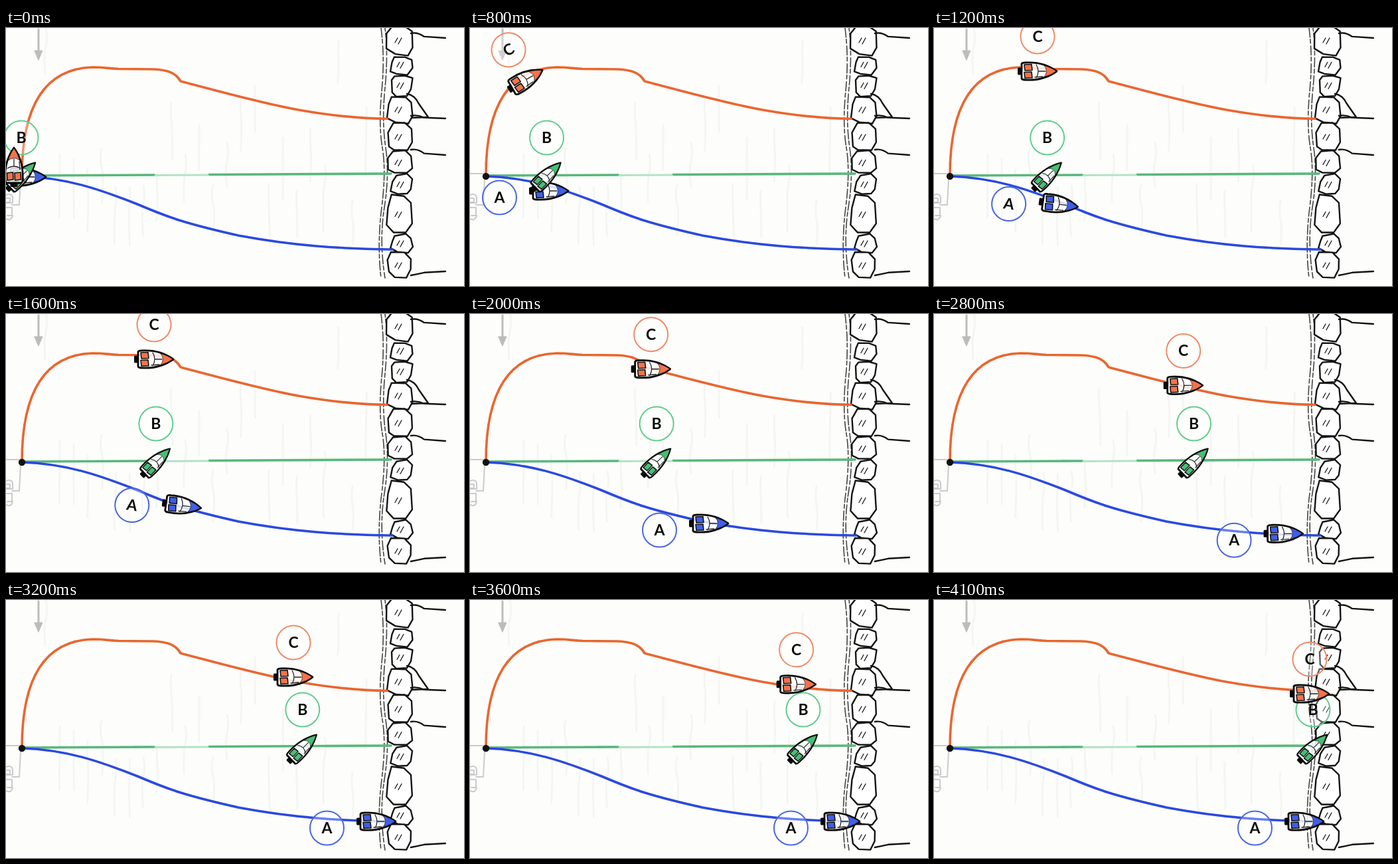
Animation of 690x388 px, one loop 4.2 s. Source, as an HTML page:

```html
<!DOCTYPE html>
<html lang="en">
<head>
<meta charset="utf-8">
<title>Three boats crossing a river</title>
<style>
html, body { margin: 0; width: 100%; height: 100%; overflow: hidden; background: #fdfefb; }
svg { display: block; width: 100%; height: 100%; }
path, circle, line { fill: none; stroke-linecap: round; stroke-linejoin: round; }
.ripples { stroke: #f5f6f2; stroke-width: 3; }
.arrow { stroke: #bcbcbc; stroke-width: 3; }
.dock { stroke: #cbcbcb; stroke-width: 2; }
.bank { stroke: #141414; stroke-width: 2.4; }
.bank .thin { stroke-width: 1.3; }
.bank .edge { stroke: #444; stroke-width: 1.6; stroke-dasharray: 14 3 6 4; }
.stone { fill: #fff; }
.routes { stroke-width: 3.6; }
.boat .hull { fill: rgba(255, 255, 255, .82); stroke: #080808; stroke-width: 2.8; }
.boat .paint { fill: var(--paint); stroke: #111; stroke-width: 1.6; }
.boat .trim { stroke: #222; stroke-width: 1.3; }
.boat .ring { fill: rgba(255, 255, 255, .3); stroke: var(--ring); stroke-width: 2; }
text { font: 700 23px Lato, "Open Sans", sans-serif; text-anchor: middle; fill: #0b0b0b; }
</style>
</head>
<body>
<svg viewBox="0 0 690 388" preserveAspectRatio="none">
  <path class="ripples" id="ripples"/>
  <g class="arrow">
    <line x1="49" y1="2" x2="49" y2="34"/>
    <path d="M43 34H55L49 48Z" style="fill:#bcbcbc;stroke-width:1"/>
  </g>
  <path class="dock" d="M0 219H19M22 228L20 266H9M0 251Q9 248 10 255V263H0M1 256H6V262H1M0 270H9V282H2M0 287Q8 291 10 282"/>

  <g class="bank">
    <path class="edge" d="M565 0Q571 45 566 95T567 180T566 270T565 376"/>
    <path class="edge" d="M571 0Q576 40 571 90T572 180T570 270T571 376" stroke-dashoffset="9"/>
    <path class="stone" id="stones"/>
    <path d="M604 99Q616 101 622 114L636 134L611 135"/>
    <path id="ledges"/>
    <path class="thin" id="glints"/>
  </g>

  <g class="routes">
    <path stroke="#58b87c" d="M24 222L224 221M306 220.5L580 219"/>
    <path stroke="#b4e2c3" stroke-width="3" d="M225 221.5L304 221"/>
    <path stroke="#ea6630" d="M24 222C24 150 40 62 130 59C150 59 155 61 170 61.5L222 62C245 63 256 68 263 80C320 95 385 113 440 123C490 132 530 136 574 136.5"/>
    <path stroke="#2b49e0" d="M24 223C90 225 140 242 198 265C245 285 270 294 350 312C430 327 500 332 582 333"/>
  </g>
  <circle cx="24" cy="223" r="5.2" style="fill:#111"/>
  <g id="boats"></g>
</svg>
<script>
const LOOP = 4200, STEP = 100, START = 130, TURN = 1200;
const $ = id => document.getElementById(id);

// Smooth curve through [time, x, y] points, resting at both ends
function glide(points) {
  const slope = (i, j) => {
    const a = points[Math.max(i - 1, 0)], b = points[Math.min(i + 1, points.length - 1)];
    return (b[j] - a[j]) / (b[0] - a[0]);
  };
  return time => {
    const t = Math.min(Math.max(time, points[0][0]), points[points.length - 1][0]);
    const i = Math.max(1, points.findIndex(p => p[0] >= t));
    const a = points[i - 1], b = points[i], span = b[0] - a[0], p = (t - a[0]) / span;
    return [1, 2].map(j =>
      a[j] * (1 + 2 * p) * (1 - p) ** 2 + b[j] * p * p * (3 - 2 * p) +
      span * p * (1 - p) * (slope(i - 1, j) * (1 - p) - slope(i, j) * p));
  };
}

const crossA = glide([[START, 31, 224], [800, 119, 245], [1600, 265, 288],
  [2000, 360, 315], [2400, 443, 323], [2950, 558, 333]]);
const crossB = glide([[START, 23, 223], [4100, 571, 223]]);
const crossC = glide([[TURN, 156, 65], [1600, 223, 68], [2400, 321, 98],
  [3200, 433, 116], [4100, 566, 141]]);

// Boat C swings a quarter turn before it heads across
function poseC(t) {
  if (t >= TURN) return [...crossC(t), 0];
  const angle = Math.PI / 2 * (1 - t / TURN);
  return [156 - 144 * Math.sin(angle), 65 + 144 * (1 - Math.cos(angle)) ** 1.2, -angle * 180 / Math.PI];
}

const fleet = [
  { name: 'A', paint: '#3f5fe6', ring: '#4a66e2', tilt: 0, beam: 1, label: [-74.5, 10],
    pose: t => [...crossA(t), t > 900 && t < 1800 ? 8 : 0] },
  { name: 'B', paint: '#45c074', ring: '#62cc90', tilt: -44, beam: .82, label: [0, -58],
    pose: t => [...crossB(t), 0] },
  { name: 'C', paint: '#f4734a', ring: '#f08a68', tilt: 0, beam: 1, label: [0, -52], pose: poseC }
];

function boatMarkup({ name, paint, ring, tilt, beam, label: [x, y] }) {
  return `<g class="boat" style="--paint:${paint};--ring:${ring}">
    <g transform="rotate(${tilt}) scale(1 ${beam})">
      <rect x="-30" y="-5.5" width="7" height="11" rx="1.5" fill="#0a0a0a"/>
      <path class="hull" d="M-24 -11Q-23 -13 -19 -13C-4 -14 14 -11 29 0C14 11 -4 14 -19 13Q-23 13 -24 11Z"/>
      <path class="paint" style="stroke-width:.7" d="M10 -8.5Q21 -5.5 28 0Q21 5.5 10 8.5Q17 0 10 -8.5Z"/>
      <path class="paint" d="M-20 -10L-9 -10.5L-8 -1.5L-19 -1ZM-20 1.5L-9 1L-8 10L-19 10.5Z"/>
      <path class="trim" d="M-4 9L8 8M-2 -10Q4 0 -2 10M2 0H12"/>
    </g>
    <circle class="ring" cx="${x}" cy="${y}" r="25.5"/>
    <text x="${x}" y="${y + 8}">${name}</text>
  </g>`;
}

let seed = 7;
const rand = () => (seed = seed * 16807 % 2147483647) / 2147483647;
const jitter = size => (rand() - .5) * size;

// Faint vertical ripples on the water
let ripples = '';
for (let x = 60; x < 560; x += 21) {
  ripples += `M${x} ${rand() * 260}q${jitter(8)} 14 0 28t${jitter(4)} ${30 + rand() * 50}`;
}

// Stones stacked between the seams of the wall
const seams = [-3, 41, 70, 103, 143, 185, 220, 251, 310, 338, 376];
const flat = v => Math.max(-1, Math.min(1, v * 1.35));
let stones = '', glints = '';
seams.slice(1).forEach((bottom, i) => {
  const height = bottom - seams[i], mid = bottom - height / 2;
  const half = height < 35 ? 15 : 18, x = 611 - half;
  const corners = [...Array(8).keys()].map(k => {
    const a = (k + .4) * Math.PI / 4;
    return `${x + half * flat(Math.cos(a)) + jitter(4)} ${mid + (height / 2 - 1) * flat(Math.sin(a)) + jitter(4)}`;
  });
  stones += `M${corners.join('L')}Z`;
  glints += `M${x - 3} ${mid - 4}l-4 7m10 -7l-5 9`;
});

const ledges = [[8, 7], [132, 4], [183, 8], [372, -6]]
  .map(([y, drop]) => `M610 ${y}q10 -2 20 ${drop * .7}l32 ${drop * .3}`);

$('ripples').setAttribute('d', ripples);
$('stones').setAttribute('d', stones);
$('glints').setAttribute('d', glints);
$('ledges').setAttribute('d', ledges.join(''));
$('boats').innerHTML = fleet.map(boatMarkup).join('');
const nodes = [...$('boats').children];

function draw() {
  const t = Math.floor(performance.now() % LOOP / STEP) * STEP;
  fleet.forEach(({ pose }, i) => {
    const [x, y, heading] = pose(t);
    nodes[i].setAttribute('transform', `translate(${x} ${y}) rotate(${heading})`);
  });
  requestAnimationFrame(draw);
}
draw();
</script>
</body>
</html>
```
